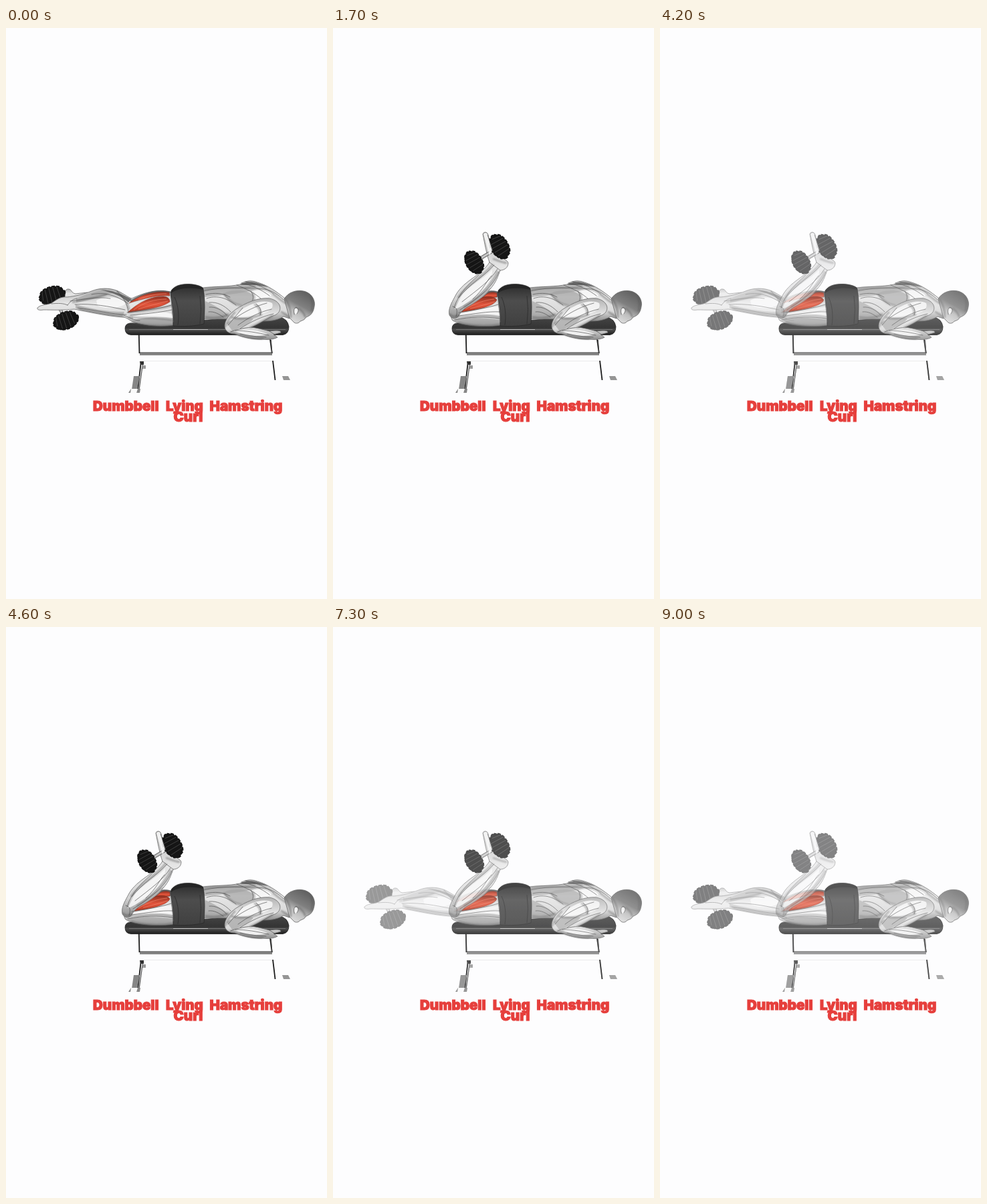
These frames come from a looping animation (480 by 853 pixels, 9100 ms). An HTML page:

```html
<!DOCTYPE html>
<html lang="en">
<head>
<meta charset="utf-8">
<title>Dumbbell Lying Hamstring Curl</title>
<style>
html, body { margin: 0; width: 100%; height: 100%; overflow: hidden; background: #fdfdfe; }
svg { display: block; width: 100%; height: 100%; }
.skin { fill: url(#skin); stroke: #6a6a6a; stroke-width: .8; stroke-linejoin: round; }
.lit { fill: #fafafa; opacity: .85; }
.mid { fill: #a2a2a2; opacity: .65; }
.deep { fill: #4c4c4c; opacity: .75; }
.line { fill: none; stroke: #484848; stroke-width: .8; stroke-linecap: round; opacity: .8; }
.soft { fill: none; stroke: #555; stroke-width: 2.6; stroke-linecap: round; opacity: .45; filter: url(#blur); }
.red { fill: url(#red); stroke: #7c2a1c; stroke-width: .5; }
.fiber { fill: none; stroke: #f48a70; stroke-width: .8; opacity: .8; }
.cloth { fill: url(#cloth); stroke: #222; stroke-width: .6; }
.title { font: 900 20.5px Inter, "Noto Sans", sans-serif; fill: #e63f3c; stroke: #e63f3c; stroke-width: 1.1; }
</style>
</head>
<body>
<svg viewBox="0 0 480 853" preserveAspectRatio="none">
<defs>
  <filter id="blur" x="-20%" y="-40%" width="140%" height="180%"><feGaussianBlur stdDeviation=".8"/></filter>
  <linearGradient id="skin" x1="0" y1="0" x2="0" y2="1">
    <stop offset="0" stop-color="#b2b2b2"/><stop offset=".4" stop-color="#e6e6e6"/>
    <stop offset=".75" stop-color="#dadada"/><stop offset="1" stop-color="#8e8e8e"/>
  </linearGradient>
  <linearGradient id="red" x1="0" y1="0" x2="0" y2="1">
    <stop offset="0" stop-color="#8f3020"/><stop offset=".5" stop-color="#e2553c"/><stop offset="1" stop-color="#b23822"/>
  </linearGradient>
  <linearGradient id="cloth" x1="0" y1="0" x2="0" y2="1">
    <stop offset="0" stop-color="#2a2a2a"/><stop offset=".4" stop-color="#4d4d4d"/><stop offset="1" stop-color="#404040"/>
  </linearGradient>
  <linearGradient id="head" x1=".75" y1="0" x2=".25" y2="1">
    <stop offset="0" stop-color="#5c5c5c"/><stop offset=".45" stop-color="#808080"/>
    <stop offset=".68" stop-color="#bebebe"/><stop offset="1" stop-color="#e2e2e2"/>
  </linearGradient>
  <linearGradient id="pad" x1="0" y1="0" x2="0" y2="1">
    <stop offset="0" stop-color="#444"/><stop offset=".6" stop-color="#343434"/>
    <stop offset=".7" stop-color="#4c4c4c"/><stop offset="1" stop-color="#1c1c1c"/>
  </linearGradient>

  <!-- stack of discs seen almost edge-on, long side along x -->
  <g id="plates" fill="#151515" stroke="#151515" stroke-width="2" stroke-dasharray="5 2">
    <ellipse cx="0" cy="7" rx="14" ry="6"/>
    <ellipse cx="0" cy="4" rx="18" ry="8"/>
    <ellipse cx="0" cy="0" rx="20" ry="9"/>
    <ellipse cx="0" cy="-5" rx="17" ry="8"/>
    <path d="M-13-9l-2 13M-8-11l-1 21M-2-12l-1 24M4-12l0 23M10-11l1 20" stroke="#4c4c4c" stroke-width=".7" stroke-dasharray="none"/>
  </g>

  <g id="bench">
    <path d="M200 484.5H398V489H200Z" fill="#858585"/>
    <path d="M200 485H398" stroke="#4c4c4c" stroke-width=".8"/>
    <path d="M200 497.500H398" stroke="#e6e6e6" stroke-width=".8"/>
    <path d="M198.800 458L199.500 486M202 498L197 541" stroke="#1c1c1c" stroke-width="1.800"/>
    <path d="M205 498L199 541" stroke="#4b4b4b" stroke-width="1.200"/>
    <path d="M200 498H206V503H201Z" fill="#303030"/>
    <path d="M205 504H209V509H204Z" fill="#989898"/>
    <path d="M191 520H200L196 540H188Z" fill="#868686"/>
    <path d="M183 545L187 539H201L200 545Z" fill="#868686"/>
    <path d="M187 539H197L195 545.500H186Z" fill="#fafafa"/>
    <path d="M394 458L397.800 486M399 497L402.500 526" stroke="#1c1c1c" stroke-width="1.800"/>
    <path d="M396.500 466L398 486" stroke="#5a5a5a" stroke-width="1"/>
    <path d="M413 520H422L425 526H415Z" fill="#959595"/>
    <path d="M185 441Q178 442 178 449Q178 458 187 458.500H414Q423 457 423 446Q421 434 409 432L340 433L240 441Z" fill="url(#pad)" stroke="#1a1a1a" stroke-width=".7"/>
    <path d="M184 450.500H418" stroke="#808080" stroke-width=".8"/>
    <path d="M250 450.500H302" stroke="#c4c4c4" stroke-width="1"/>
  </g>

  <g id="body">
    <path class="skin" d="M294 388C312 386 332 387 350 383C356 378 366 376 376 380C391 384 405 394 417 404L426 414L424 434L415 431C404 438 390 439 372 437C344 434 318 435 295 435Z"/>
    <path class="mid" d="M296 389C325 387 350 388 374 390C355 397 330 398 297 402Z"/>
    <path class="deep" d="M350 384C358 377 375 378 392 387L374 384Z"/>
    <path class="lit" d="M368 393C380 389 394 393 397 400C388 405 377 407 370 405Z"/>
    <path class="mid" d="M330 394C345 390 362 392 369 399C372 407 365 412 352 414C338 412 330 404 325 398Z"/>
    <path class="mid" d="M298 408C312 414 325 422 334 430L328 434L298 434Z"/>
    <path class="soft" d="M297 390C325 385 345 390 372 386M326 398C336 410 343 414 352 415M369 396Q374 404 368 411M299 432C310 434 322 433 332 428M400 398C408 404 414 410 420 412M412 424L424 432"/>
    <path class="line" d="M295 393C325 386 360 388 386 390C398 392 408 399 415 406M345 384C360 390 372 396 382 405M352 381C368 384 382 391 394 400M358 379C374 382 388 388 400 397M300 404C314 399 328 402 344 414M304 410C316 409 326 414 336 424M304 417C313 416 323 421 330 429M303 424C311 423 318 427 325 432M366 393C371 400 371 405 366 411M299 398C312 395 325 396 335 402"/>
    <path class="cloth" d="M246 395C249 386 260 382 274 382.500C285 383 293 386 295 389C298 405 297.500 425 296 442C280 446 264 446 250 445C251 428 248 411 246 395Z"/>
    <path d="M247 396C258 387 282 387 295 391L294 388C285 383 260 379 247 392Z" fill="#252525"/>
    <path d="M252 402C258 415 259 430 257 444M290 400Q293 420 290 442" fill="none" stroke="#2c2c2c" stroke-width=".8"/>
    <path d="M416 405C421 395 435 390 447 393.500C458 397 463 408 461 416C460 423 457 428 453 430L448 432.500C447 436 443 437 440 438C438 441 434 442 431 440L424 433C421 424 419 414 416 405Z" fill="url(#head)" stroke="#626262" stroke-width=".8"/>
    <path class="soft" d="M418 405C423 412 426 420 426 432M438 419Q446 425 447 431M456 402Q460 411 457 422"/>
    <path class="lit" d="M431 419Q436 418 437 422Q436 427 433 428Q430 425 431 419Z"/>
    <path class="line" d="M431 428Q429 419 434 417Q440 420 435 427"/>
    <path class="skin" d="M394 404C377 402 358 411 344 420C334 427 327 437 327 445C327 453 334 457 342 457C356 463 372 466 384 465C393 466 401 465 406 462L400 458L411 455C411 451 402 452 394 453C383 450 374 448 367 447C383 440 394 431 402 429C414 424 413 408 394 404Z"/>
    <path class="lit" d="M352 421C367 411 385 405 398 411C402 421 388 426 372 430C358 433 347 434 343 430Z"/>
    <path class="mid" d="M330 441C341 431 356 432 370 434C366 441 354 446 339 453Z"/>
    <path class="lit" d="M343 453C359 448 375 451 391 457C381 462 361 461 343 453Z"/>
    <path class="soft" d="M336 432C350 436 366 434 382 428M366 447C376 443 386 436 398 430M372 413Q383 420 379 429M336 454C350 460 368 464 384 464M328 446Q331 436 342 425"/>
    <path class="line" d="M390 411C374 415 356 424 342 434M397 420C380 424 363 432 347 444M400 427C382 431 366 439 350 449M354 418C347 426 340 435 332 444M367 447C355 448 342 451 336 454M343 452C358 452 376 455 393 459M350 457C365 460 375 461 389 462M374 412C380 417 383 422 380 429M394 453L402 458"/>
  </g>

  <g id="straight">
    <path class="skin" d="M84 404C89 395 88 390 93 390C99 390 97 396 104 397L122 395L120 407Z"/>
    <use href="#plates" transform="translate(69 399.500) rotate(-16)"/>
    <path d="M79 416L89 436" stroke="#6c6c6c" stroke-width="5"/>
    <path d="M79 416L89 436" stroke="#c8c8c8" stroke-width="3"/>
    <use href="#plates" transform="translate(89.500 437) rotate(-20) scale(.98)"/>
    <path class="skin" d="M47 418C52 413 60 414 68 411C77 405 82 401 91 402C103 401 118 397 128 393C140 388 154 388 165 392C175 396 182 402 188 404C203 397 224 389 246 394L250 444C227 447 204 444 190 439C182 435 180 432 174 432C150 430 124 424 102 420C84 422 68 421 56 421C50 422 46 421 47 418Z"/>
    <path class="lit" d="M135 407C149 399 166 401 181 410C171 420 151 420 137 415Z"/>
    <path class="mid" d="M105 404C126 395 145 390 163 394C151 400 128 406 105 410Z"/>
    <path class="mid" d="M104 413C126 419 149 424 177 424L174 431C150 430 124 424 104 419Z"/>
    <path class="lit" d="M190 431C210 425 231 422 248 427L249 433C226 430 205 433 190 436Z"/>
    <path class="mid" d="M187 437C207 432 229 433 249 437V444C229 446 205 444 187 437Z"/>
    <path class="deep" d="M140 391C158 391 174 398 188 405L183 410C174 401 160 395 140 391Z"/>
    <path class="deep" d="M186 407C205 396 224 389 246 394L244 397C222 394 204 402 186 410Z"/>
    <path class="red" d="M184 411C199 400 220 392 244 395L245 400C225 399 207 404 184 411Z"/>
    <path class="red" d="M182 425C196 412 214 401 235 401C242 401 245 405 245 409C233 418 207 421 182 425Z"/>
    <path class="fiber" d="M191 421C206 410 222 405 240 405M198 420C213 415 226 412 242 408M198 406C212 399 227 397 240 397"/>
    <path class="soft" d="M100 410C122 404 136 403 150 398M110 420C134 425 156 430 176 430M184 432C206 434 226 432 248 436M166 394Q180 404 184 420M188 440C206 444 230 446 249 444M184 425C208 422 228 420 247 415"/>
    <path class="line" d="M96 408C117 405 138 401 156 404M103 413C129 411 154 416 178 421M107 418C134 421 158 428 180 428M128 398C146 394 165 399 183 412M166 393C176 403 181 411 183 424M181 425C204 422 228 420 247 414M186 429C209 427 230 425 248 421M176 429C185 433 192 437 200 437M68 412C78 411 86 411 92 414M92 414C96 409 99 405 106 404"/>
  </g>

  <g id="bent">
    <path class="skin" d="M246 394C238 391 227 395 219 403L186 423C178 427 174 431 179 437C190 444 222 448 250 444Z"/>
    <path class="deep" d="M225 396C231 391 240 392 246 394V402L222 404Z"/>
    <path class="red" d="M228 399C233 394 240 394 245 396V402L222 404Z"/>
    <path class="red" d="M187 425L216 405C228 400 240 400 245 406C241 416 216 421 187 425Z"/>
    <path class="fiber" d="M198 420C213 411 228 406 241 405M205 419C219 416 231 412 242 409"/>
    <path class="lit" d="M190 427C211 422 231 418 247 416L249 430C229 426 208 429 188 433Z"/>
    <path class="mid" d="M180 436C203 431 227 433 249 436V444C228 446 196 444 180 436Z"/>
    <path class="skin" d="M224 308C225 304 231 304 232 309C234 318 239 331 245 339C251 344 261 346 262 351C262 358 256 362 250 362C247 370 244 380 235 390C227 400 215 408 206 414C196 419 191 424 187 431C183 436 176 434 174 428C172 420 177 411 182 402C187 391 196 383 207 375C217 368 228 360 234 350C230 339 227 323 224 308Z"/>
    <path class="lit" d="M193 398C204 384 224 376 238 361C239 376 227 393 208 406C200 411 189 418 182 420Z"/>
    <path class="mid" d="M236 388C224 394 209 407 195 419L207 413C222 404 230 398 236 388Z"/>
    <path class="soft" d="M238 354C226 370 202 382 187 402M246 364C238 384 219 401 196 416M175 428Q181 434 188 428M186 432C208 430 228 428 248 432M188 440C208 446 232 446 249 443M240 345Q252 350 259 351"/>
    <path class="line" d="M241 354C228 370 204 382 188 403M246 360C235 378 216 391 193 409M248 364C241 384 222 401 190 421M218 369C204 382 188 395 181 418M234 350C239 354 245 358 250 362M237 370C230 377 225 391 209 405M179 416C185 417 187 422 184 431M188 425C210 422 231 418 247 413M188 430C212 427 232 423 249 424M182 436C205 431 228 431 249 434"/>
    <path d="M214 348L239 333" stroke="#6c6c6c" stroke-width="5"/>
    <path d="M214 348L239 333" stroke="#c8c8c8" stroke-width="3"/>
    <use href="#plates" transform="translate(249 326.500) rotate(59)"/>
    <use href="#plates" transform="translate(211 350) rotate(59) scale(.93)"/>
    <path class="lit" d="M225 308Q228 304 231 308L238 332L234 340Z"/>
    <path class="line" d="M231 309L239 333"/>
  </g>
</defs>

<rect width="480" height="853" fill="#fdfdfe"/>
<g id="down"><use href="#bench"/><use href="#straight"/><use href="#body"/></g>
<g id="up" opacity="0"><use href="#bench"/><use href="#bent"/><use href="#body"/></g>
<g class="title">
  <text x="130" y="571.500">Dumbbell</text>
  <text x="239" y="571.500">Lying</text>
  <text x="304.500" y="571.500">Hamstring</text>
  <text x="250.500" y="588">Curl</text>
</g>
</svg>
<script>
const LOOP = 9100, STEP = 100;
const down = document.getElementById("down");
const up = document.getElementById("up");
// start and end of each dissolve, alternating lift and lower
const fades = [[1000, 1700], [2600, 3000], [3900, 4600], [5400, 6100], [6900, 7600], [8400, 9100]];

function levels(t) {
  let lifted = false;
  for (const [start, end] of fades) {
    if (t < start) break;
    if (t < end) {
      const p = (t - start) / (end - start);
      // lowering stops halfway and snaps at its end
      return lifted ? [p * .62, 1 - p * .55] : [1 - p, Math.sqrt(p)];
    }
    lifted = !lifted;
  }
  return lifted ? [0, 1] : [1, 0];
}

function draw() {
  const t = Math.floor(performance.now() % LOOP / STEP) * STEP;
  const [a, b] = levels(t);
  down.setAttribute("opacity", a);
  up.setAttribute("opacity", b);
  requestAnimationFrame(draw);
}
draw();
</script>
</body>
</html>
```
